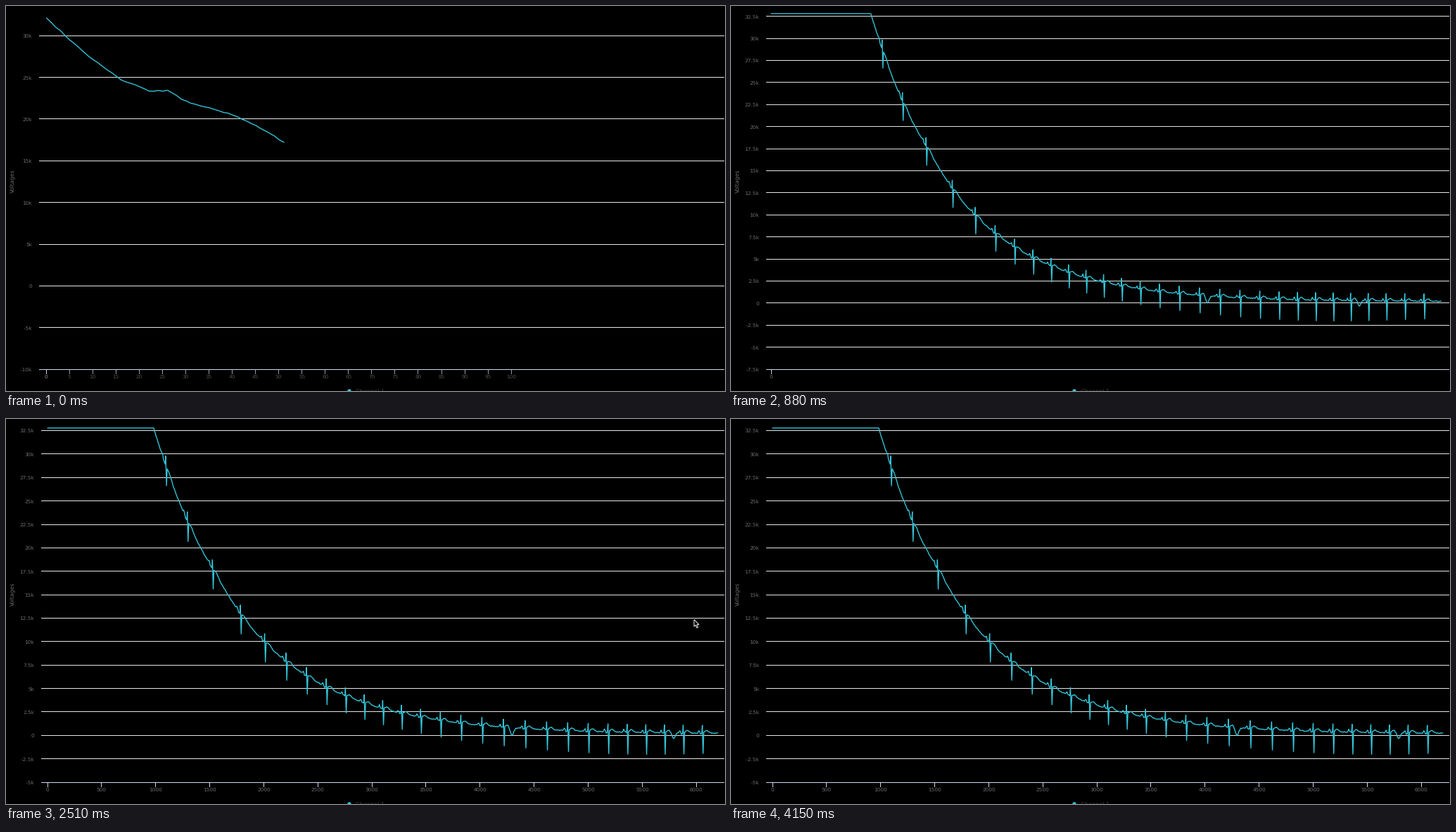
Recreate the animation shown at these times as a matplotlib script. Size 1022 px wide and 548 px high, loop 4300 ms.

```python
import math

import numpy as np
import matplotlib.pyplot as plt
from matplotlib.animation import FuncAnimation
from matplotlib.patches import Circle, FancyBboxPatch, Polygon

W, H, DPI = 1022, 548, 100
LOOP, STEP = 4300, 20
PX = 72 / DPI
CYAN, GRID, AXIS, LABEL = "#34c6da", "#e6e6e6", "#ccd6eb", "#6c6c6c"

plt.rcParams["font.family"] = "DejaVu Sans"
plt.rcParams["text.hinting"] = "none"
fig = plt.figure(figsize=(W / DPI, H / DPI), dpi=DPI, facecolor="black")
ax = fig.add_axes([0, 0, 1, 1])
ax.set(xlim=(0, W), ylim=(H, 0))
ax.axis("off")

# Y axes: lowest value in thousands, step, pixels per step, left edge
COARSE = (-10, 5, 59.35, 47)
MEDIUM = (-7.5, 2.5, 31.4, 50)
FINE = (-5, 2.5, 33.37, 50)
BOTTOM = 517

# Scales of the trace: y of zero, pixels per thousand
EARLY_SCALE = (460, 13.62)
MEDIUM_SCALE = (422.8, 12.57)
FINE_SCALE = (450.3, 13.35)
FINAL_COUNT, WIDE_COUNT, SPAN = 6200, 8400, 953
LEFT, DROP = 59, 210          # start of the trace and of its decay
PER_SAMPLE = SPAN / FINAL_COUNT


def bell(x, center, width):
    return np.exp(-((x - center) / width) ** 2)


def beat_positions(end):
    """Heartbeats come in slowly breathing intervals with one early pause."""
    x, i = 227, 0
    while x < end:
        yield x
        x += 28.6 + 2.2 * math.cos(math.tau * (i - 16) / 14) + 9 * bell(i, 1.9, 1.2)
        i += 1


def make_signal():
    """Sample numbers and values (in thousands) of the whole recording."""
    rng = np.random.default_rng(4)
    zero, per_k = FINE_SCALE
    restless = LEFT + 6655 * PER_SAMPLE
    beats = np.array(list(beat_positions(restless - 8)))

    def resting(x):
        level = 32.6 * np.exp((DROP - x) / 131) + 0.15 + 0.4 * bell(x, 297, 30)
        y = zero - per_k * level + 11 * bell(x, 719, 3.5) + 8 * bell(x, 949, 3)
        gap = np.subtract.outer(x, beats)
        waves = (-4 * bell(gap, -4.7, 1.1) + 2 * bell(gap, -2.2, 1.2)
                 - 3.5 * bell(gap, 6, 3.8))
        return y + waves.sum(axis=-1)

    x = np.arange(DROP + 1, restless, 1.3)
    x = x[np.abs(np.subtract.outer(x, beats)).min(axis=1) > 2.4]
    points = list(zip(x, resting(x) + rng.uniform(-0.6, 0.6, x.size)))
    for i, beat in enumerate(beats):
        before, after = resting(np.array([beat - 0.8, beat + 2.1]))
        low = before + 27 + 4 * math.cos(math.tau * i / 22)
        points += [(beat - 0.8, before), (beat, before - 11.5),
                   (beat + 1.1, low), (beat + 2.1, after)]

    x, side = restless, -1
    while x < LEFT + WIDE_COUNT * PER_SAMPLE:
        points.append((x, zero + side * rng.uniform(6, 29)))
        x += rng.uniform(1.6, 7)
        side = -side
    points = [(LEFT, 12.8), (DROP, 12.8)] + sorted(points)
    x, y = np.array(points).T
    return (x - LEFT) / PER_SAMPLE, (zero - y) / per_k


SAMPLE, VALUE = make_signal()


def show_line(x, y, width=1.35):
    return ax.plot(x, y, color=CYAN, lw=width * PX, zorder=3,
                   solid_joinstyle="round", solid_capstyle="round")


def trace(count, scale, x0=57, width=1.35):
    keep = SAMPLE <= count
    x = x0 + SAMPLE[keep] * SPAN / count
    return show_line(x, scale[0] - VALUE[keep] * scale[1], width)


def buzzing_trace(count, scale):
    """Trace whose newest part is covered by a comb of interference."""
    rng = np.random.default_rng(11)
    x = 57 + SAMPLE * SPAN / count
    keep = x < 861
    xs, ys = list(x[keep]), list(scale[0] - VALUE[keep] * scale[1])
    at = 862.0
    while at < 1010:
        burst = 905 < at < 948
        up, down = rng.uniform(1, 9, 2) if burst else (2, 5.5)
        xs += [at, at + 0.4, at + 0.9, at + 1.3]
        ys += [454, 454 - up, 454 + down, 454.5]
        at += 1.7 if burst else 3.5
    return show_line(xs, ys)


def opening_trace(end, medium=False):
    """The first few samples, which fall in uneven steps."""
    keys = [(57, 17), (108, 64), (130, 81), (166, 106), (205, 121), (232, 120),
            (250, 134), (324, 155), (353, 169), (395, 194), (553, 270), (762, 350)]
    rng = np.random.default_rng(2)
    x = np.arange(57.5, end + 1, 6.62)
    y = np.interp(x, *np.array(keys).T) + rng.uniform(-1, 1, x.size)
    if medium:
        y = MEDIUM_SCALE[0] - (398.4 - y) / 11.87 * MEDIUM_SCALE[1]
    return show_line(x, y)


def rule(x, y, color, alpha=1):
    return ax.plot(x, y, color=color, alpha=alpha, lw=PX, snap=False,
                   solid_capstyle="butt", zorder=1)


def label(x, y, text, size=7.4, color=LABEL, **kw):
    return ax.text(x, y, text, size=size * PX, color=color, **kw)


def y_axis(lowest, step, gap, left):
    artists, y, value = [], BOTTOM, lowest
    while y > 0:
        row = math.floor(y + 0.1) + 0.5
        artists += rule([left, 1021], [row, row], AXIS if y == BOTTOM else GRID)
        text = f"{value:g}k".replace("-", "–") if value else "0"
        artists.append(label(left - 10, y + 2.9, text, ha="right"))
        y, value = y - gap, value + step
    return artists


def x_ticks(x0, per_sample, values, alpha=1.0):
    artists = []
    for v in values:
        x = x0 + v * per_sample
        column = int(x) + 0.5
        artists += rule([column] * 2, [BOTTOM + 1, BOTTOM + 7], AXIS, alpha)
        artists.append(label(x, 529.5, str(v), ha="center", alpha=alpha, clip_on=True))
    return artists


def cursor(x, y):
    shape = [(0, 0), (0, 9.8), (2.3, 7.8), (4, 11.8), (5.6, 11.1), (4, 7.2), (7, 7)]
    return [ax.add_patch(Polygon([(x + dx, y + dy) for dx, dy in shape], fc="black",
                                 ec="white", lw=0.9 * PX, zorder=9))]


def dot(x, y, radius, alpha=1, zorder=4):
    return ax.add_patch(Circle((x, y), radius, fc=CYAN, lw=0, alpha=alpha, zorder=zorder))


def tooltip(left, top, sample, value, alpha=0.85, marker=True):
    ink = min(1, alpha * 1.2)
    artists = [ax.add_patch(FancyBboxPatch(
        (left + 1, top + 1), 79, 27.5, boxstyle="round,pad=0.3,rounding_size=1.5",
        fc=(0.97, 0.97, 0.97, alpha), ec=(0.2, 0.78, 0.86, alpha), lw=0.7 * PX, zorder=6))]
    artists.append(dot(left + 8.5, top + 20, 1.5, ink, 7))
    for dx, dy, text, size, weight in [(6, 12.3, str(sample), 6.7, "normal"),
                                       (12.5, 22.8, "Channel 1:", 7.9, "normal"),
                                       (58.5, 22.8, str(value).replace("-", "–"), 7.9, "bold")]:
        artists.append(label(left + dx, top + dy, text, size, "#333333",
                             weight=weight, alpha=ink, zorder=7))
    if marker:
        x = LEFT + sample * PER_SAMPLE
        y = FINE_SCALE[0] - value / 1000 * FINE_SCALE[1]
        artists += [dot(x, y, 7, 0.25), dot(x, y, 3.6)]
    return artists


# Parts that never change
label(9.3, 249, "Voltages", 7.9, LABEL, rotation=90, ha="center", va="center")
label(497, 551, "Channel 1", 8.2, "#404040", clip_on=True)
dot(488, 548, 2.7)

coarse, medium, fine = (y_axis(*spec) for spec in (COARSE, MEDIUM, FINE))
origin = x_ticks(57, 1, [0])
short_ticks = x_ticks(57, 6.612, range(0, 101, 5), 0.72) + origin
settled = fine + x_ticks(LEFT, PER_SAMPLE, range(0, 6001, 500))


def growing(count):
    """Live phase: old tick labels slide left and fade in as samples arrive."""
    ticks = []
    if count > 7000:
        per_sample = 0.1386 + (WIDE_COUNT - count) * 1.6e-5
        ticks = x_ticks(57.5, per_sample, [5000, 6000, 7000], 0.45)
    return medium + origin + ticks + trace(count, MEDIUM_SCALE)


def settling(p):
    """Old and new tick labels glide to their final places, p from 0 to 1."""
    x0 = LEFT - 1.5 * (1 - p)
    artists = fine + x_ticks(x0, 0.1414 + 0.0122 * p ** 1.3, [0, 5000, 6000], 0.6 + 0.4 * p)
    if p > 0:
        new = [*range(500, 5000, 1000), 5500]
        artists += x_ticks(LEFT, 0.095 + 0.0586 * math.sqrt(p), new, p)
    count = FINAL_COUNT if p > 0 else 7300
    return artists + trace(count, FINE_SCALE, x0)


def final_line(width=1.35):
    return settled + trace(FINAL_COUNT, FINE_SCALE, LEFT, width)


thin, thick = final_line(), final_line(2.1)
last_tip = (920, 457, 5893, -1338)

SCENES = [
    (0, coarse + short_ticks + opening_trace(395)),
    (150, medium + short_ticks + opening_trace(553, True)),
    (300, medium + short_ticks + opening_trace(762, True)),
    (440, coarse + origin + trace(3500, EARLY_SCALE)),
    (590, coarse + origin + buzzing_trace(5015, EARLY_SCALE)),
    (730, growing(5700)),
    (880, growing(6600)),
    (1020, growing(7500)),
    (1170, growing(WIDE_COUNT)),
    (1320, settling(0)),
    (1470, settling(0.25)),
    (1620, settling(0.7)),
    (1770, thin),
    (2510, thin + cursor(978, 285.5)),
    (2660, thick + tooltip(892, 409, 5686, 354) + cursor(934, 470)),
    (2810, thick + tooltip(866, 413, 5517, 210) + cursor(908, 477)),
    (2960, thick + tooltip(898, 413, 5738, 191) + cursor(942.5, 486.5)),
    (3110, thick + tooltip(908.5, 413, 5794, -75) + cursor(951, 517)),
    (3260, final_line(1.95) + tooltip(*last_tip) + cursor(963, 518)),
    (3410, final_line(1.7) + tooltip(*last_tip, marker=False) + cursor(963, 518)),
    (3560, final_line(1.45) + tooltip(*last_tip, marker=False) + cursor(975, 529)),
    (3710, thin + tooltip(*last_tip, alpha=0.4, marker=False) + cursor(986, 537)),
    (3860, thin + cursor(994, 544)),
    (4000, thin + cursor(994, 547)),
    (4150, thin),
]
STARTS = [start for start, _ in SCENES]
CHANGING = {artist for _, scene in SCENES for artist in scene}


def update(frame):
    time = frame * STEP + STEP / 2
    scene = SCENES[np.searchsorted(STARTS, time, side="right") - 1][1]
    for artist in CHANGING:
        artist.set_visible(False)
    for artist in scene:
        artist.set_visible(True)
    return scene


anim = FuncAnimation(fig, update, frames=LOOP // STEP, interval=STEP,
                     repeat=True, repeat_delay=0, blit=False)
plt.show()
```
